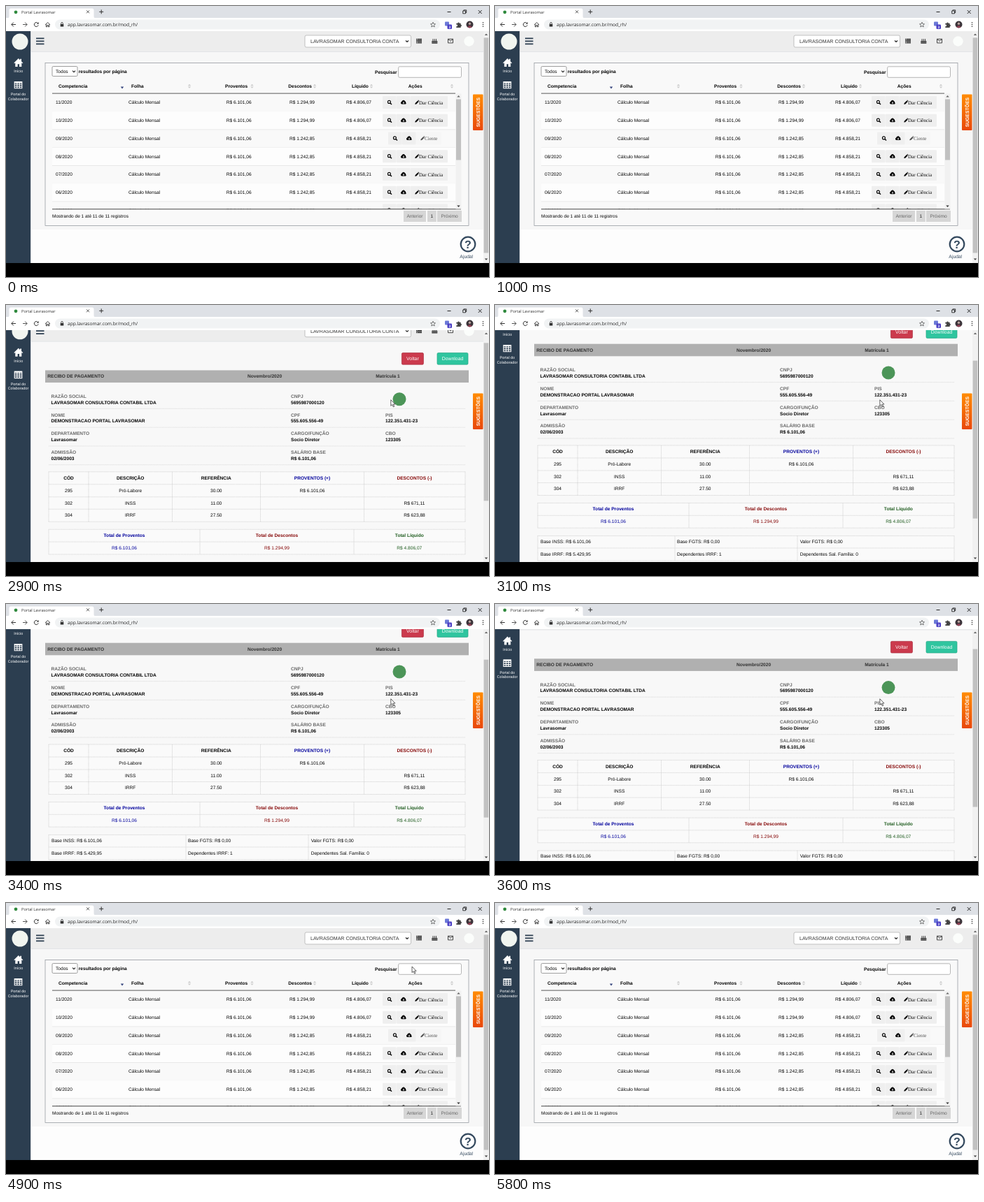
Recreate the animation shown at these times as an HTML page. Size 690 px wide and 388 px high, loop 6300 ms.

```html
<!DOCTYPE html>
<html lang="pt-BR">
<head>
<meta charset="utf-8">
<title>Portal Lavrasomar</title>
<style>
html, body { margin: 0; width: 100%; height: 100%; overflow: hidden; background: #000; }
svg { display: block; width: 690px; height: 388px; font-family: "Liberation Sans", Arial, sans-serif; text-rendering: geometricPrecision; }
.ui { font-family: "Open Sans", sans-serif; }
.serif { font-family: "Liberation Serif", serif; }
text { white-space: pre; }
</style>
</head>
<body>
<svg id="stage" viewBox="0 0 690 388" xmlns="http://www.w3.org/2000/svg"></svg>
<script>
const LOOP = 6300, STEP = 100;
const NAVY = '#2c3e50', INK = '#050505';

const rect = (x, y, w, h, fill, extra = '') =>
  `<rect x="${x}" y="${y}" width="${w}" height="${h}" fill="${fill}" ${extra}/>`;
const box = (x, y, w, h, fill, stroke, r = 0) =>
  rect(x, y, w, h, fill, `stroke="${stroke}" stroke-width=".7" rx="${r}"`);
const dot = (x, y, r, fill, extra = '') => `<circle cx="${x}" cy="${y}" r="${r}" fill="${fill}" ${extra}/>`;
const line = (d, color, w = 1, extra = '') =>
  `<path d="${d}" fill="none" stroke="${color}" stroke-width="${w}" ${extra}/>`;
const shape = (d, fill, extra = '') => `<path d="${d}" fill="${fill}" ${extra}/>`;
const at = (x, y, s) => `<g transform="translate(${x} ${y})">${s}</g>`;
const text = (s, x, y, o = {}) =>
  `<text x="${x}" y="${y}" font-size="${o.size || 6.6}" fill="${o.fill || INK}"` +
  ` text-anchor="${o.anchor || 'start'}" font-weight="${o.bold ? 700 : 400}" class="${o.cls || ''}">${s}</text>`;
const mid = (s, x, y, o = {}) => text(s, x, y, { ...o, anchor: 'middle' });
const bold = (s, x, y, fill) => text(s, x, y, { bold: true, fill });
const chevron = (x, y) => line(`M${x - 2} ${y - 1}l2 2l2-2`, '#222', 1.1);
const tri = (x, y, h, fill) => shape(`M${x - 2.2} ${y}h4.4l-2.2 ${h}z`, fill);
const button = (label, x, w, fill, edge) =>
  box(x, 81.8, w, 16.6, fill, edge, 1.5) + mid(label, x + w / 2, 92.4, { size: 6.9, fill: '#fff' });

const lens = (x, y) => at(x, y, dot(-.6, -.6, 2, 'none', `stroke="${INK}" stroke-width="1.1"`) + line('M.9 .9L3 3', INK, 1.4));
const cloud = (x, y) => at(x, y,
  shape('M-2.6 2.5a1.8 1.8 0 0 1-.2-3.5a2.5 2.5 0 0 1 4.7-.8a1.6 1.6 0 0 1 1.2 2a1.3 1.3 0 0 1-.4 2.3z', INK) +
  line('M0-1V1', '#eee', .9) + shape('M-1.4 .4h2.8l-1.4 1.6z', '#eee'));
const pencil = (x, y, c) => at(x, y, shape('M-2.8 2.8l.5-1.9l3.5-3.5l1.5 1.5l-3.5 3.5zM1.5-2.9l.6-.5l1.4 1.4l-.5 .6z', c));
const sorter = (x, y) => tri(x, y - .6, -2.4, '#ccc') + tri(x, y + .6, 2.4, '#ccc');

function browser() {
  let s = rect(0, 0, 690, 18, '#dee1e6') + rect(0, 17, 690, 19, '#fff');
  s += shape('M2 17.5q2.5 0 2.5-3V6q0-2.5 2.5-2.5H123q2.5 0 2.5 2.5v8.5q0 3 2.5 3z', '#fff');
  s += dot(14, 8.8, 2.4, '#2f8a3e');
  s += text('Portal Lavrasomar', 22, 10.9, { size: 5.7, fill: '#333', cls: 'ui' });
  s += line('M115 6.3l4 4m0-4l-4 4', '#444', .9) + line('M133.2 8.3h6m-3-3v6', '#333', 1);
  s += line('M630.5 8.5h5M674.7 6l5 5m0-5l-5 5', '#111', .9);
  s += line('M652.7 7h3.8v3.8h-3.8zM653.9 7V5.8h3.8v3.8h-1.2', '#111', .8);
  s += line('M14 26.5H8m2.8-3L7.8 26.5l3 3', '#333', 1) + line('M24 26.5h6m-2.8-3l3 3l-3 3', '#555', 1);
  s += line('M45.6 24.6a3 3 0 1 0 .6 2.7', '#333', 1) + shape('M46.6 23v2.8h-2.8z', '#333');
  s += line('M56.2 26.8l3.4-3.3l3.4 3.3M57.3 26.2v3.6h1.5v-2.2h1.6v2.2h1.5v-3.6', '#333', .9);
  s += rect(70, 19.5, 550, 14, '#f1f3f4', 'rx="7"');
  s += rect(77.7, 26, 4.6, 3.6, '#333', 'rx=".5"') + line('M78.7 26v-1.2a1.3 1.3 0 0 1 2.6 0V26', '#333', .8);
  s += text('app.lavrasomar.com.br/mod_rh/', 88, 29, { size: 6.6, fill: '#222', cls: 'ui' });
  s += line('M610 23.2l1 2.4l2.5 .2l-1.9 1.7l.6 2.5l-2.2-1.4l-2.2 1.4l.6-2.5l-1.9-1.7l2.5-.2z', '#444', .7);
  s += rect(627, 22.5, 6, 6, '#6c79d8', 'rx="1"') + rect(630.5, 26.5, 6.5, 6.5, '#4b3fc4', 'rx="1.2"');
  s += mid('3', 633.8, 31.7, { size: 5, fill: '#fff', bold: true });
  s += shape('M643.3 24.8h2a1.2 1.2 0 1 1 2.4 0h2v2a1.2 1.2 0 1 1 0 2.4v1.8h-6.4v-2a1.2 1.2 0 1 0 0-2.2z', '#444');
  s += dot(662.5, 26.5, 5, '#3b343a') + dot(662.5, 25.3, 1.7, '#b9a39d') + shape('M659.3 30.2q3.2-4.4 6.4 0q-3.2 2.2-6.4 0z', '#8d3f52');
  for (const y of [23.8, 26.5, 29.2]) s += dot(681.5, y, .8, '#333');
  return s;
}

function header() {
  let s = dot(20, 51, 11.5, '#f1f5f0');
  s += shape('M11.3 81.5L17.8 75l2.4 2.4v-1.6h1.8v3.4l2.3 2.3l-.8 .8l-1.2-1.1v5.7h-3.3v-3.6h-2.4v3.6h-3.3v-5.7l-1.2 1.1z', '#fff');
  s += mid('Início', 17.7, 95, { size: 5.4, fill: '#fff' });
  s += line('M12.2 108.5h10.6v9.3H12.2zM12.2 112h10.6M12.2 115h10.6M15.8 109v8.5M19.3 109v8.5', '#fff', 1.1) + rect(12, 108, 11, 2.2, '#fff');
  s += mid('Portal do', 17.5, 128, { size: 5.4, fill: '#fff' }) + mid('Colaborador', 17.5, 134.6, { size: 5.4, fill: '#fff' });
  s += rect(35.4, 36, 646.6, 29.5, '#ededed') + rect(35.4, 65, 646.6, .7, '#dcdfe2');
  s += line('M43 46.3h11.5M43 50.3h11.5M43 54.3h11.5', NAVY, 1.8);
  s += box(427, 42, 151.5, 17, '#fff', '#aaa', 2);
  s += text('LAVRASOMAR CONSULTORIA CONTA', 435, 53, { size: 7.05, fill: '#333' }) + chevron(573, 50.5);
  for (const y of [46.8, 49.2, 51.6]) s += rect(586, y, 8, 1.8, '#333') + rect(587, y + .6, 1, .6, '#fff');
  s += rect(608.3, 50, 8, 3.7, '#333') + line('M610 50v-3M612.3 50v-3M614.6 50v-3', '#333', .9) + line('M608.3 51.7h8', '#ededed', .5);
  s += line('M631.5 47.3h7v5.6h-7zl3.5 3l3.5-3', '#333', .9);
  return s + dot(661.5, 50.5, 7.2, '#fbfdfb');
}

function tableRow(month, i) {
  const y = 125.3 + 25.75 * i, base = y + 15.1, c = y + 12.7;
  const newer = i < 2, seen = i === 2;
  let s = i % 2 ? rect(66, y, 576, 25.75, '#fdfdfd') : '';
  s += rect(66, y + 25.6, 576, .6, '#ddd');
  s += text(month, 71, base) + text('Cálculo Mensal', 175, base);
  [['6.101,06', 350.6], [newer ? '1.294,99' : '1.242,85', 441], [newer ? '4.806,07' : '4.858,21', 522]]
    .forEach(([v, x]) => s += text('R$ ' + v, x, base, { anchor: 'end' }));
  const x = seen ? 546 : 538, tint = seen ? '#555' : INK;
  s += rect(x, c - 9, 19.6, 18, '#efefef', 'rx="1"') + rect(x + 20, c - 9, 19.6, 18, '#efefef', 'rx="1"');
  s += rect(x + 40, c - 9, seen ? 36 : 53, 18, seen ? '#f6f6f6' : '#efefef', 'rx="1"');
  s += lens(x + 10, c) + cloud(x + 30, c) + pencil(x + 49, c, tint);
  return s + text(seen ? 'Ciente' : 'Dar Ciência', x + 52, c + 2.6, { size: 7.1, fill: tint, cls: 'serif' });
}

function listPage() {
  let s = rect(35.4, 65, 646.6, 255, '#f7f7f7') + rect(35.4, 320, 646.6, 48, '#fdfdfd');
  s += box(56, 81.4, 605, 233, '#f9f9f9', '#8b9097');
  s += box(66, 86.5, 36, 14, '#fff', '#777', 1.5) + text('Todos', 71, 95.8) + chevron(97, 93.7);
  s += bold('resultados por página', 103.8, 96.1) + bold('Pesquisar', 527, 97.2);
  s += box(560.5, 86.8, 90, 15.5, '#fff', '#999', 2);
  [['Competencia', 75], ['Folha', 179], ['Proventos', 313], ['Descontos', 403.3], ['Líquido', 494], ['Ações', 574.8]]
    .forEach(([h, x]) => s += bold(h, x, 116.9));
  s += tri(166, 115.5, 3, '#34437c');
  for (const x of [262, 351.5, 441, 522, 637]) s += sorter(x, 114.8);
  s += '<g clip-path="url(#rows)">';
  for (let i = 0; i < 7; i++) s += tableRow(String(11 - i).padStart(2, '0') + '/2020', i);
  s += '</g>' + rect(66, 124.7, 576, .8, '#333') + rect(66, 290.4, 584, .9, '#333');
  s += rect(642.5, 125.5, 8, 165, '#f1f1f1') + rect(643, 133.5, 7, 87, '#c1c1c1');
  s += tri(646.5, 130.4, -2.4, '#666') + tri(646.5, 285.5, 2.4, '#333');
  s += text('Mostrando de 1 até 11 de 11 registros', 66, 302.7, { size: 6.5 });
  [['Anterior', 568, 32], ['1', 602, 12.8], ['Próximo', 616, 35]].forEach(([t, x, w]) =>
    s += rect(x, 293, w, 16, '#d6d6d6') + mid(t, x + w / 2, 303.3, { fill: t === '1' ? '#222' : '#666' }));
  s += dot(660, 341, 10.3, '#fff', 'stroke="#34495e" stroke-width="2.2"');
  s += mid('?', 660, 346.8, { size: 16, bold: true, fill: '#34495e' });
  return s + mid('Ajuda!', 658, 361.2, { size: 6.8, fill: '#34495e' });
}

// Dotted table frame from column and row edges
function grid(xs, ys) {
  const x0 = xs[0], x1 = xs[xs.length - 1], y0 = ys[0], y1 = ys[ys.length - 1];
  return rect(x0, y0, x1 - x0, y1 - y0, '#fafafa') +
    line(xs.map(x => `M${x} ${y0}V${y1}`).join('') + ys.map(y => `M${x0} ${y}H${x1}`).join(''), '#c4c4c4', .6, 'stroke-dasharray="1.2 .6"');
}

function detailPage() {
  const blue = '#00009c', red = '#860808', green = '#1f5c1f', label = '#696969', bar = '#303030';
  let s = rect(35.4, 65, 646.6, 440, '#f8f8f8');
  s += button('Voltar', 565.4, 31, '#cb3a4d', '#a92c3d') + button('Download', 616, 44, '#2fc59f', '#25a686');
  s += rect(56, 106.7, 605, 17.6, '#b0b0b0');
  s += bold('RECIBO DE PAGAMENTO', 59.3, 117.5, bar) + bold('Novembro/2020', 345, 117.5, bar) + bold('Matrícula 1', 528.3, 117.5, bar);
  const info = [
    ['RAZÃO SOCIAL', 'LAVRASOMAR CONSULTORIA CONTABIL LTDA', 'CNPJ', '5695987000120'],
    ['NOME', 'DEMONSTRACAO PORTAL LAVRASOMAR', 'CPF', '555.605.556-49', 'PIS', '122.351.431-23'],
    ['DEPARTAMENTO', 'Lavrasomar', 'CARGO/FUNÇÃO', 'Socio Diretor', 'CBO', '123305'],
    ['ADMISSÃO', '02/06/2003', 'SALÁRIO BASE', 'R$ 6.101,06']
  ];
  info.forEach((r, i) => {
    const y = 146 + 26.8 * i;
    [64.5, 407, 542].forEach((x, k) => {
      if (r[2 * k]) s += bold(r[2 * k], x, y, label) + bold(r[2 * k + 1], x, y + 8.9);
    });
    s += line(`M61 ${y + 15.6}H656`, '#cfcfcf', .6, 'stroke-dasharray="1.2 .6"');
  });
  s += dot(562, 148, 9.5, '#4c9558');

  s += grid([61, 118, 237.5, 363.5, 511.5, 656], [252, 270, 288, 305.5, 323.5]);
  const cols = [89.5, 177.7, 300.3, 437.5, 583.5];
  ['CÓD', 'DESCRIÇÃO', 'REFERÊNCIA', 'PROVENTOS (+)', 'DESCONTOS (-)'].forEach((h, k) =>
    s += mid(h, cols[k], 263.3, { bold: true, fill: [INK, INK, INK, blue, red][k] }));
  [['295', 'Pró-Labore', '30.00', 'R$ 6.101,06', ''], ['302', 'INSS', '11.00', '', 'R$ 671,11'], ['304', 'IRRF', '27.50', '', 'R$ 623,88']]
    .forEach((r, i) => r.forEach((v, k) => s += mid(v, cols[k], 281.3 + 17.5 * i)));

  s += grid([61, 277, 497, 656], [334.5, 352.3, 370.2]);
  [['Proventos', 'de ', '6.101,06', 169, blue], ['Descontos', 'de ', '1.294,99', 387, red], ['Líquido', '', '4.806,07', 576.3, green]]
    .forEach(([n, of, v, x, c]) => s += mid(`Total ${of}${n}`, x, 345.3, { bold: true, fill: c }) + mid('R$ ' + v, x, 363.3, { fill: c }));

  s += grid([61, 257, 432, 656], [381.5, 399, 417]);
  [['Base INSS: R$ 6.101,06', 'Base FGTS: R$ 0,00', 'Valor FGTS: R$ 0,00'], ['Base IRRF: R$ 5.429,95', 'Dependentes IRRF: 1', 'Dependentes Sal. Família: 0']]
    .forEach((r, i) => r.forEach((v, k) => s += text(v, [65, 260, 435.7][k], 391.9 + 17.6 * i)));
  return s;
}

const stage = document.getElementById('stage');
stage.innerHTML = `<defs>
  <clipPath id="view"><rect y="36" width="690" height="332"/></clipPath>
  <clipPath id="rows"><rect x="66" y="125" width="576" height="165.5"/></clipPath>
  <linearGradient id="orange" x2="0" y2="1"><stop stop-color="#ff8c05"/><stop offset="1" stop-color="#e8480c"/></linearGradient>
</defs>
<rect width="690" height="388"/>
<g clip-path="url(#view)">
  ${rect(0, 36, 690, 332, '#f8f8f8')}${rect(0, 36, 35.4, 332, NAVY)}
  <g id="scroll"><g id="list">${listPage()}</g><g id="detail">${detailPage()}</g>${header()}</g>
  ${rect(682, 36, 8, 332, '#f1f1f1')}<rect id="thumb" x="682.6" width="6.6" fill="#c1c1c1"/>
  ${tri(686, 42, -2.5, '#666')}${tri(686, 361.5, 2.5, '#444')}
  ${rect(667, 126.5, 14.5, 51.5, 'url(#orange)', 'rx="1"')}
  <g transform="translate(676.6 152.2) rotate(-90)">${mid('SUGESTÕES', 0, 0, { size: 6.8, bold: true, fill: '#fff' })}</g>
</g>
${browser()}
<path id="cursor" d="M0 0v8.6l2-1.8l1.5 3.3l1.4-.6l-1.5-3.2h2.7z" fill="#fff" stroke="#222" stroke-width=".7"/>`;

const el = id => document.getElementById(id);
const parts = { list: el('list'), detail: el('detail'), scroll: el('scroll'), thumb: el('thumb'), cursor: el('cursor') };
const show = (node, on) => node.setAttribute('display', on ? 'inline' : 'none');

// Eased value between keys of [time, value]
function track(keys, t) {
  if (t <= keys[0][0]) return keys[0][1];
  for (let i = 1; i < keys.length; i++) {
    const [a, va] = keys[i - 1], [b, vb] = keys[i];
    if (t <= b) {
      const p = (t - a) / (b - a);
      return va + (vb - va) * p * p * (3 - 2 * p);
    }
  }
  return keys[keys.length - 1][1];
}

const scrollKeys = [[2800, 0], [3100, 51], [3500, 51], [3600, 28.4], [3800, 0]];
const xKeys = [[1900, 692], [2200, 549.8], [3800, 549.8], [4100, 575.5], [4300, 580], [5200, 580], [5500, 692]];
const yKeys = [[1900, 270], [2200, 135.8], [3800, 135.8], [4100, 102], [4300, 91], [5200, 91], [5500, 170]];

function draw(t) {
  const detail = t >= 2700 && t < 4600;
  const scroll = track(scrollKeys, t);
  show(parts.list, !detail);
  show(parts.detail, detail);
  parts.scroll.setAttribute('transform', `translate(0 ${-scroll})`);
  parts.thumb.setAttribute('y', 45.5 + scroll * .67);
  parts.thumb.setAttribute('height', detail ? 226 : 308);
  show(parts.cursor, t >= 2000 && t < 5500);
  parts.cursor.setAttribute('transform', `translate(${track(xKeys, t)} ${track(yKeys, t)})`);
}

const start = performance.now();
function tick() {
  const t = (performance.now() - start) % LOOP;
  draw(Math.floor(t / STEP) * STEP);
  requestAnimationFrame(tick);
}
draw(0);
requestAnimationFrame(tick);
</script>
</body>
</html>
```
